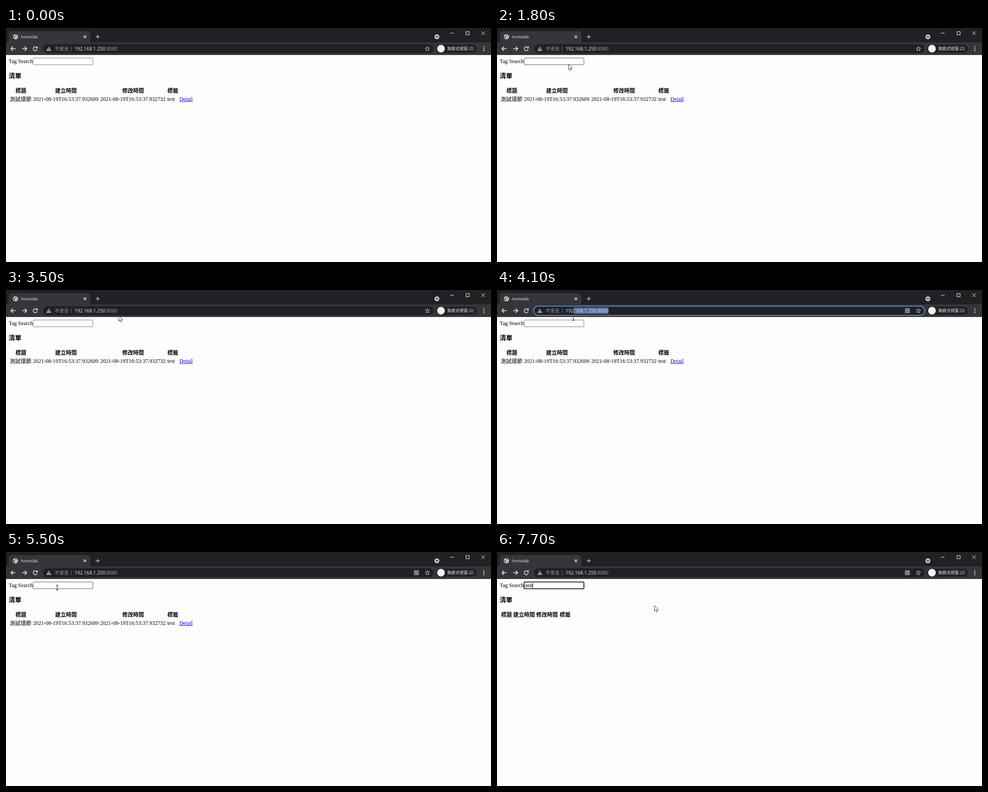
These frames come from a looping animation (1076x520 px, 8 s). An HTML page with a canvas:

```html
<!DOCTYPE html>
<html lang="zh-Hant">
<head>
<meta charset="utf-8">
<title>homelab</title>
<style>
html, body { margin: 0; width: 100%; height: 100%; overflow: hidden; background: #fdfdfd; }
canvas { display: block; width: 1076px; height: 520px; }
</style>
</head>
<body>
<canvas id="stage"></canvas>
<script>
const W = 1076, H = 520, LOOP = 8000, STEP = 100;
const canvas = document.getElementById('stage');
const ctx = canvas.getContext('2d');
const dpr = window.devicePixelRatio || 1;
canvas.width = W * dpr;
canvas.height = H * dpr;

const CJK = '"Noto Sans CJK TC", "Noto Sans CJK JP", "Noto Sans CJK"';
const SERIF = `"Liberation Serif", ${CJK}, serif`;
const UI = `"Open Sans", ${CJK}, sans-serif`;
const INPUT = '"Liberation Sans", sans-serif';
const BAR = '#35363a', DARK = '#202124', LIGHT = '#e8eaed', GREY = '#9aa0a6';

const FOCUS_URL = 3900, BLUR_URL = 5100, FOCUS_INPUT = 5600, FILTER = 6600;
const KEYS = [[6500, 'a'], [7100, 's'], [7700, 'd']];

// Pointer path: time, x, y
const PATH = [
  [100, 158, 80], [2000, 158, 80], [2900, 232, 286], [3000, 232, 286],
  [3500, 250, 57], [3800, 258, 47], [4000, 258, 47], [4100, 169, 62],
  [4300, 62, 60], [4500, 62, 60], [4800, 110, 128], [5000, 140, 309],
  [5200, 140, 309], [5500, 113, 79], [6200, 113, 79], [6600, 348, 121],
  [7400, 348, 121], [7600, 349, 119]
];

function pointerAt(t) {
  if (t < PATH[0][0]) return null;
  const i = PATH.findIndex(p => p[0] > t);
  if (i < 0) return PATH[PATH.length - 1].slice(1);
  const [t0, x0, y0] = PATH[i - 1], [t1, x1, y1] = PATH[i];
  const k = (t - t0) / (t1 - t0);
  return [x0 + (x1 - x0) * k, y0 + (y1 - y0) * k];
}

function text(str, x, y, size, color = '#000', family = SERIF, weight = 400) {
  ctx.font = `${weight} ${size}px ${family}`;
  ctx.fillStyle = color;
  ctx.fillText(str, x, y);
  return ctx.measureText(str).width;
}

function rect(x, y, w, h, color) {
  ctx.fillStyle = color;
  ctx.fillRect(x, y, w, h);
}

function pill(x, y, w, h, r) {
  ctx.beginPath();
  ctx.roundRect(x, y, w, h, r);
}

function fillPill(x, y, w, h, r, color) {
  pill(x, y, w, h, r);
  ctx.fillStyle = color;
  ctx.fill();
}

function disc(x, y, r, color) {
  ctx.beginPath();
  ctx.arc(x, y, r, 0, Math.PI * 2);
  ctx.fillStyle = color;
  ctx.fill();
}

function trace(points, close) {
  ctx.beginPath();
  points.forEach(([x, y]) => ctx.lineTo(x, y));
  if (close) ctx.closePath();
}

function line(points, color, width = 1, close = false) {
  trace(points, close);
  ctx.strokeStyle = color;
  ctx.lineWidth = width;
  ctx.stroke();
}

function shape(points, color) {
  trace(points, true);
  ctx.fillStyle = color;
  ctx.fill();
}

function cross(x, y, r, color, width) {
  line([[x - r, y - r], [x + r, y + r]], color, width);
  line([[x + r, y - r], [x - r, y + r]], color, width);
}

function globe(x, y) {
  disc(x, y, 5.6, LIGHT);
  shape([[x - 4, y - 2], [x - 1, y + .5], [x - .5, y + 4.5], [x - 3, y + 3], [x - 4.6, y]], BAR);
  shape([[x, y - 4.5], [x + 3, y - 3], [x + 2, y - .5], [x - 1, y - 1.5]], BAR);
  shape([[x + 1.5, y + 1], [x + 4.3, y + 1], [x + 3, y + 3.5]], BAR);
}

function arrow(x, y, dir) {
  line([[x - 5 * dir, y], [x + 5 * dir, y]], LIGHT, 1.6);
  line([[x + .5 * dir, y - 4.6], [x + 5 * dir, y], [x + .5 * dir, y + 4.6]], LIGHT, 1.6);
}

function reload(x, y) {
  ctx.beginPath();
  ctx.arc(x, y, 4.5, .35, Math.PI * 1.72);
  ctx.strokeStyle = LIGHT;
  ctx.lineWidth = 1.6;
  ctx.stroke();
  shape([[x + 5.4, y - 5.5], [x + 5.4, y - .7], [x + .6, y - .7]], LIGHT);
}

function star(x, y) {
  const points = Array.from({ length: 10 }, (_, i) => {
    const a = i * Math.PI / 5 - Math.PI / 2, r = i % 2 ? 2.3 : 5.2;
    return [x + r * Math.cos(a), y + r * Math.sin(a)];
  });
  line(points, '#d5d7da', 1, true);
}

function gridIcon(x, y) {
  ctx.strokeStyle = '#c8cacd';
  ctx.lineWidth = 1.2;
  for (const dx of [-4.5, 1]) {
    for (const dy of [-4.5, 1]) ctx.strokeRect(x + dx, y + dy, 3.5, 3.5);
  }
}

function tabStrip() {
  rect(0, 0, W, 60, BAR);
  rect(0, 0, W, 32, DARK);
  fillPill(6, 7, 181, 26, [6, 6, 0, 0], BAR);
  globe(21, 19.5);
  text('homelab', 33, 23, 9.2, LIGHT, UI);
  cross(175, 19.5, 2.8, LIGHT, 1.3);
  line([[199, 19.5], [208, 19.5]], '#d5d7da', 1.3);
  line([[203.5, 15], [203.5, 24]], '#d5d7da', 1.3);

  disc(956, 19.5, 5.5, '#bdc1c6');
  shape([[953, 18.2], [959, 18.2], [956, 21.6]], DARK);
  line([[985, 11.5], [993, 11.5]], '#fff');
  ctx.strokeStyle = '#fff';
  ctx.strokeRect(1020.5, 8, 7, 7);
  cross(1058.5, 11.5, 4, '#fff', 1);
}

function addressBar(t, pointer) {
  const focused = t >= FOCUS_URL && t < BLUR_URL;
  arrow(16, 46, -1);
  arrow(41, 46, 1);
  reload(65, 46);

  fillPill(82, 36, 867, 20, 10, DARK);
  if (focused) {
    pill(81.5, 35.8, 867, 20.6, 10.3);
    ctx.strokeStyle = '#6392dd';
    ctx.lineWidth = 1.8;
    ctx.stroke();
  }
  shape([[95, 41], [100.6, 51], [89.4, 51]], GREY);
  rect(94.4, 44.3, 1.2, 3.2, DARK);
  rect(94.4, 48.5, 1.2, 1.2, DARK);
  text('不安全', 108, 50, 10.4, GREY, UI);
  rect(144, 40, 1, 12, '#6a6d72');

  const host = '192.168.1.250', port = ':8080', x = 152;
  if (focused) selection(t, host + port, x, pointer[0]);
  const w = text(host, x, 49.7, 10.5, LIGHT, UI);
  text(port, x + w, 49.7, 10.5, focused ? LIGHT : GREY, UI);

  if (t >= FOCUS_URL) gridIcon(910.5, 46);
  star(935, 46.3);

  fillPill(954, 37, 91, 18, 9, DARK);
  disc(965, 46, 8.5, '#f1f3f4');
  text('無痕式視窗 (2)', 979, 49.4, 9.1, LIGHT, UI, 500);
  for (const y of [41.7, 46, 50.3]) disc(1060, y, 1.2, LIGHT);
}

// Drag to the left: the edge snaps to the next letter boundary.
function selection(t, url, x, px) {
  ctx.font = `400 10.5px ${UI}`;
  const edge = n => x + ctx.measureText(url.slice(0, n)).width;
  let n = 0;
  if (t < 4300) while (n < url.length && edge(n) < px) n++;
  rect(edge(n), 39, edge(url.length) - edge(n), 14, '#50719b');
}

function searchField(t, hover) {
  text('Tag Search', 6, 78, 12);
  const focused = t >= FOCUS_INPUT;
  pill(60.2, 66.7, 132.6, 15, 1.8);
  ctx.fillStyle = '#fff';
  ctx.fill();
  ctx.strokeStyle = focused ? '#101010' : hover ? '#555' : '#767676';
  ctx.lineWidth = focused ? 1.8 : 1;
  ctx.stroke();
  if (!focused) return;

  const typed = KEYS.filter(k => k[0] <= t);
  const last = typed.length ? typed[typed.length - 1][0] : FOCUS_INPUT;
  const w = text(typed.map(k => k[1]).join(''), 62.7, 78, 10, '#000', INPUT);
  if (Math.floor((t - last) / 500) % 2 === 0) rect(62.7 + w, 69, 1, 11, '#000');
}

function table(filtered) {
  text('清單', 6, 111, 14.04, '#000', SERIF, 700);
  const cols = filtered ? [9, 36, 87, 139] : [21, 109, 258, 358];
  ['標題', '建立時間', '修改時間', '標籤'].forEach((s, i) =>
    text(s, cols[i], 144, 12, '#000', SERIF, 700));
  if (filtered) return;
  text('測試環節', 8.5, 162.5, 12);
  text('2021-08-19T16:53:37.932609', 60, 162, 12);
  text('2021-08-19T16:53:37.932732', 209, 162, 12);
  text('test', 358, 162, 12);
  const w = text('Detail', 384.8, 162, 12, '#0000ee');
  rect(384.8, 163, w, 1, '#0000ee');
}

function arrowPointer(x, y) {
  const points = [[0, 0], [0, 12.2], [2.8, 9.6], [4.8, 14], [6.6, 13.2], [4.7, 9], [8.5, 9]]
    .map(([dx, dy]) => [x + .5 + dx, y + .3 + dy]);
  shape(points, '#fff');
  line(points, '#222', .9, true);
}

function beamPointer(x, y) {
  ctx.globalCompositeOperation = 'difference';
  rect(x, y - 5, 1, 11, '#fff');
  for (const dy of [-6, 5]) {
    rect(x - 2, y + dy, 2, 1, '#fff');
    rect(x + 1, y + dy, 2, 1, '#fff');
  }
  ctx.globalCompositeOperation = 'source-over';
}

function draw(t) {
  const pointer = pointerAt(t);
  const [px, py] = pointer || [-50, -50];
  const inside = (x0, y0, x1, y1) => px >= x0 && px < x1 && py >= y0 && py < y1;
  const overInput = inside(60, 66, 193, 82);
  const dragging = t >= 4000 && t < 4400;

  ctx.setTransform(dpr, 0, 0, dpr, 0, 0);
  rect(0, 0, W, H, '#fdfdfd');
  tabStrip();
  addressBar(t, [px, py]);
  searchField(t, overInput);
  table(t >= FILTER);
  if (!pointer) return;
  // The resting pointer keeps its arrow until it first reaches the address bar.
  const beam = dragging || (t > 3500 && (overInput || inside(104, 36, 900, 56)));
  (beam ? beamPointer : arrowPointer)(Math.round(px), Math.round(py));
}

const start = performance.now();
function tick() {
  const t = (performance.now() - start) % LOOP;
  draw(Math.floor(t / STEP) * STEP);
  requestAnimationFrame(tick);
}
tick();
</script>
</body>
</html>
```
